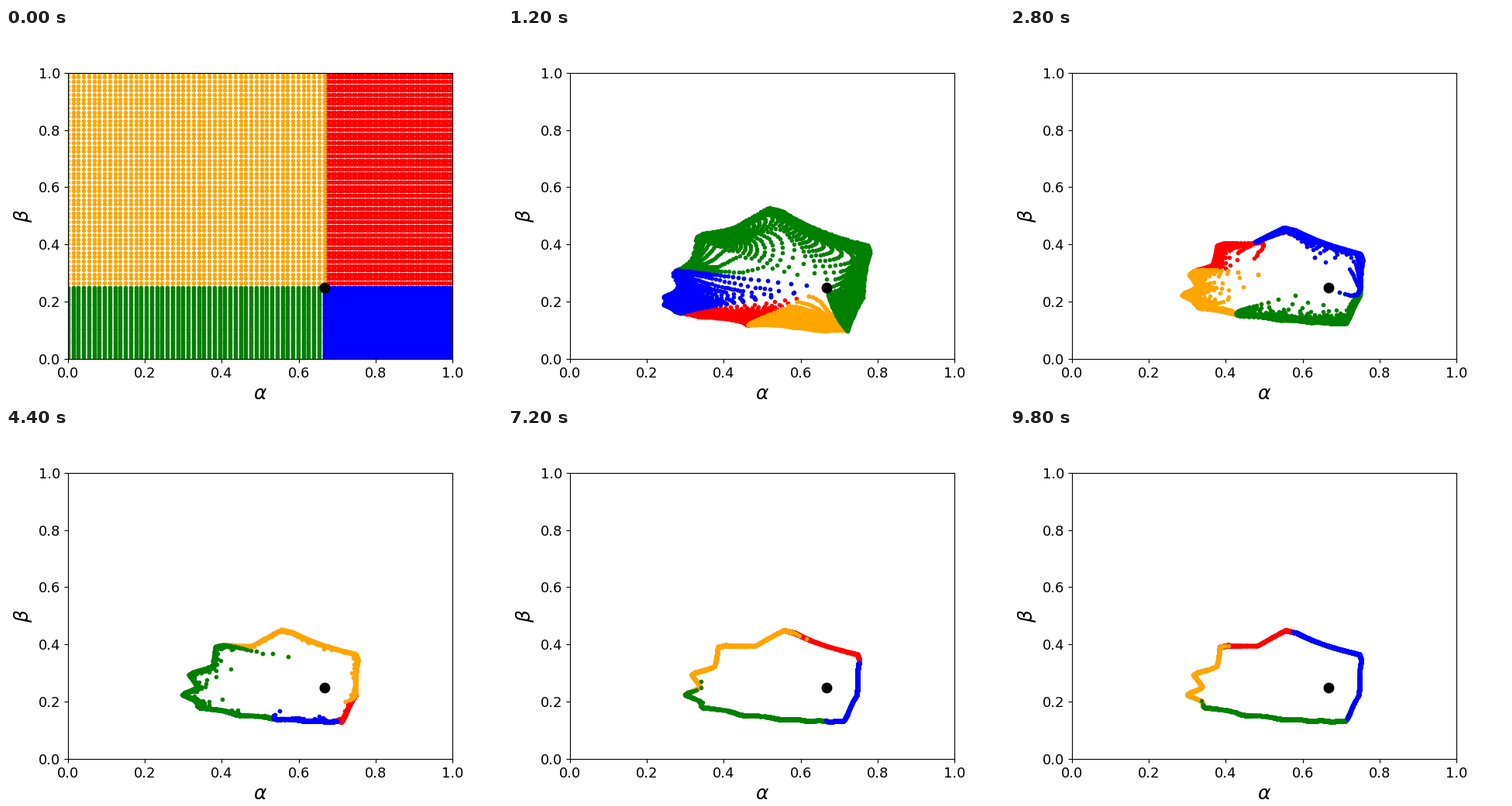
A matplotlib script for the animation above (10000 ms loop, 640 by 480 pixels).

```python
import numpy as np
import matplotlib.pyplot as plt
from matplotlib.animation import FuncAnimation

STEPS = 50
SIDE = 50
EQ_A, EQ_B = 2 / 3, 1 / 4   # mixed equilibrium


def respond(p, gain):
    """Nash map for one player: shift p towards the better pure action."""
    up = np.maximum(0, (1 - p) * gain)
    down = np.maximum(0, -p * gain)
    return (p + up) / (1 + up + down)


def step(a, b):
    return respond(a, 1 - 4 * b), respond(b, 3 * a - 2)


def block(a_range, b_range):
    a, b = np.meshgrid(np.linspace(*a_range, SIDE), np.linspace(*b_range, SIDE))
    return a.ravel(), b.ravel()


def orbit(a, b):
    path = [(a, b)]
    for _ in range(STEPS - 1):
        path.append(step(*path[-1]))
    return path


low_a, high_a = (0, EQ_A), (EQ_A, 1)
low_b, high_b = (0, EQ_B), (EQ_B, 1)
quadrants = [
    ("red", high_a, high_b),
    ("orange", low_a, high_b),
    ("green", low_a, low_b),
    ("blue", high_a, low_b),
]

fig, ax = plt.subplots(figsize=(6.4, 4.8), dpi=100)
ax.set_xlim(0, 1)
ax.set_ylim(0, 1)
ax.tick_params(labelsize=13)
ax.set_xlabel(r"$\alpha$", fontsize=18)
ax.set_ylabel(r"$\beta$", fontsize=18)

clouds = []
for color, a_range, b_range in quadrants:
    dots, = ax.plot([], [], ".", color=color)
    clouds.append((dots, orbit(*block(a_range, b_range))))
ax.plot(EQ_A, EQ_B, "ko", markersize=9)


def draw(n):
    for dots, path in clouds:
        dots.set_data(*path[n])
    return [dots for dots, _ in clouds]


anim = FuncAnimation(fig, draw, frames=STEPS, init_func=lambda: draw(0),
                     interval=200, repeat=True, repeat_delay=0)
plt.show()
```
